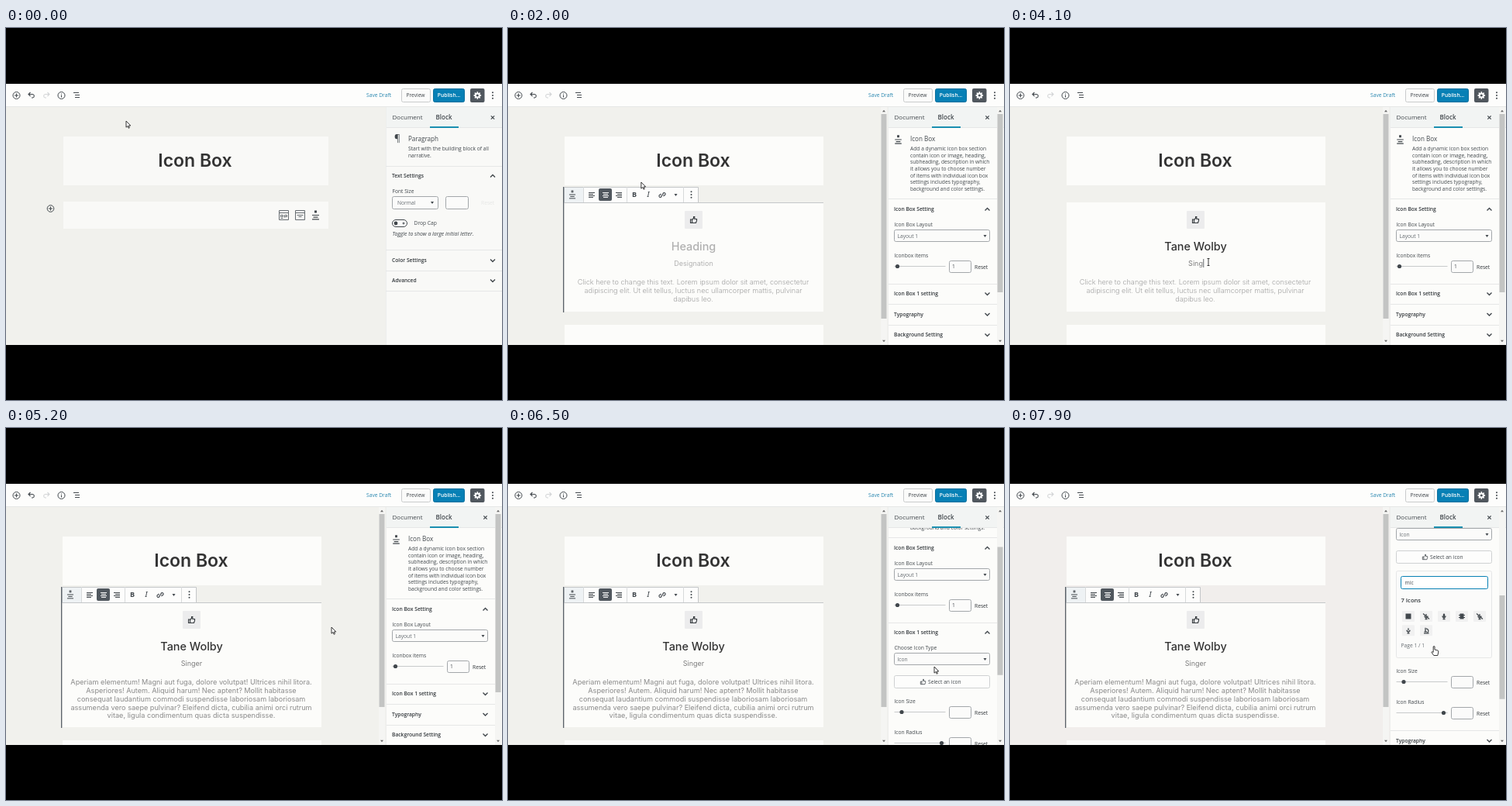
Animation, 640 px wide and 480 px high, one loop 8 s. Source, as an HTML page with a canvas:

```html
<!DOCTYPE html>
<html lang="en">
<head>
<meta charset="utf-8">
<title>Icon Box block</title>
<style>
html, body { margin: 0; width: 100%; height: 100%; overflow: hidden; background: #000; }
canvas { display: block; }
</style>
</head>
<body>
<canvas id="stage" width="640" height="480"></canvas>
<script>
const ctx = document.getElementById('stage').getContext('2d');
const LOOP = 8000, STEP = 100;
const UI = '"Open Sans", "Noto Sans", sans-serif', HEAD = 'Inter, sans-serif';
const INK = '#41474c', SOFT = '#666c71', LINE = '#e6e7e7', BLUE = '#0780b5', EDGE = '#a3a7aa';
const NAME = 'Tane Wolby', ROLE = 'Singer', QUERY = 'mic';

const PLACEHOLDER = [
  'Click here to change this text. Lorem ipsum dolor sit amet, consectetur',
  'adipiscing elit. Ut elit tellus, luctus nec ullamcorper mattis, pulvinar',
  'dapibus leo.'];
const COPY = [
  'Aperiam elementum! Magni aut fuga, dolore volutpat! Ultrices nihil litora.',
  'Asperiores! Autem. Aliquid harum! Nec aptent? Mollit habitasse',
  'consequat laudantium commodi suspendisse laboriosam laboriosam',
  'assumenda vero saepe pulvinar? Eleifend dicta, cubilia animi orci rutrum',
  'vitae, ligula condimentum quas dicta suspendisse.'];
const ABOUT = ['Add a dynamic icon box section', 'contain icon or image, heading,',
  'subheading, description in which', 'it allows you to choose number',
  'of items with individual icon box', 'settings includes typography,',
  'background and color settings.'];

// Icon outlines around their own centre
const ICON = {
  undo: 'M-4 -1H1.5A2.3 2.3 0 0 1 1.5 3.5H0M-1.5 -3.5L-4 -1L-1.5 1.5',
  redo: 'M4 -1H-1.5A2.3 2.3 0 0 0 -1.5 3.5H0M1.5 -3.5L4 -1L1.5 1.5',
  list: 'M-4 -3H3M-2 0H4M-2 3H4',
  plus: 'M-2.5 0H2.5M0 -2.5V2.5',
  close: 'M-2.2 -2.2L2.2 2.2M2.2 -2.2L-2.2 2.2',
  up: 'M-3 1.5L0 -1.5L3 1.5',
  down: 'M-3 -1.5L0 1.5L3 -1.5',
  section: 'M-6 -6H6V6H-6ZM-6 -3H6M-4 0H-1V2H-4ZM1 3V0H4V2H1M-4 4H-1',
  callback: 'M-6 -6H6V6H-6ZM-4 0H4M-2 2H2M-6 -3H6',
  iconbox: 'M-1.5 -4.5H1.5M-1.5 -3.5H1.5M-1.5 -5.5H1.5M-4.5 0H4.5M-3 2.7H3M-4.5 5.4H4.5',
  spacer: 'M-5 -6H5M-5 6H5M0 -4V4M-2 -2L0 -4L2 -2M-2 2L0 4L2 2M-4 0H4',
  divider: 'M-6 -6H6V6H-6Z',
  heading: 'M-3.5 2L0 -6L3.5 2M-2 -1H2M-5 4H5',
  profile: 'M-2 -4A2 2 0 1 0 2 -4A2 2 0 1 0 -2 -4M-5 1H5M-3 3.5H3M-1.5 6H1.5',
  accordion: 'M-6 -5H6V-3H-6ZM-4 0H5M-6 2H3M-6 5H6',
  masonry: 'M-6 -6H-3V-3H-6ZM-1 -6H1V-2H-1ZM3 -6H6V-3H3ZM-6 -1H-3V2H-6ZM3 -1H6V2H3ZM-6 4H-3V6H-6ZM-1 0H1V6H-1ZM3 4H6V6H3Z',
  lines: 'M-5 -4H5M-5 -1H5M-5 2H5M-5 5H1',
  image: 'M-6 -5H6V5H-6ZM-6 3L-2 -1L1 2L3 0L6 3',
  link: 'M-.5 1.5L-2 3A1.9 1.9 0 0 1 -4 .5L-1.5 -1.5M.5 -1.5L2 -3A1.9 1.9 0 0 1 4 -.5L1.5 1.5M-1.5 1L1.5 -1',
  thumb: 'M-4 -.5H-2V4H-4ZM-2 0L0 -2V-4H1.3V-1H4V1L3 4H-2',
  mic: 'M0 -3V0M-2 -.5A2 2 0 0 0 2 -.5M0 1.5V3.5M-1.5 3.5H1.5',
  slash: 'M-4 -3.5L4 3.5',
  scope: 'M-1 -3.5V1M-3 3.5H3.5M0 -2.5A3 3 0 0 1 1.5 3M-2.5 1.5H1'
};

const MOST_USED = [['lines', 'Paragraph'], ['image', 'Image'], ['heading', 'Heading'],
  ['section', 'Gallery'], ['lines', 'List'], ['lines', 'Quote'],
  ['callback', 'Button'], ['image', 'Cover'], ['image', 'Video']];
const CREATIVE = [['section', 'Section'], ['callback', 'Callback'], ['iconbox', 'Icon Box'],
  ['spacer', 'Spacer'], ['divider', 'Divider'], ['heading', 'Advanced|Heading'],
  ['profile', 'Profile Box'], ['accordion', 'Accordion'], ['masonry', 'Post Masonry']];

const POINTER = [[0, 155, 120], [350, 13, 87], [450, 13, 87], [700, 100, 230], [1000, 88, 259],
  [1100, 88, 259], [1450, 163, 190], [1900, 163, 190], [2400, 248, 276], [3300, 248, 276],
  [3600, 256, 302], [4400, 256, 302], [4700, 240, 339], [4900, 240, 339], [5200, 420, 257],
  [5300, 420, 257], [5700, 565, 341], [5900, 565, 341], [6200, 550, 308], [6500, 550, 308],
  [6600, 551, 325], [6900, 551, 325], [7100, 545, 199], [7600, 545, 199], [7900, 547, 282]];
const POINTER_KIND = [[0, 'arrow'], [300, 'hand'], [1600, 'arrow'], [2300, 'beam'],
  [4900, 'arrow'], [5600, 'hand'], [6000, 'arrow'], [6600, 'hand'], [7100, 'beam'], [7800, 'hand']];
const SIDE_SCROLL = [[0, 0], [5900, 0], [6200, 79], [6650, 79], [6900, 240]];
const LIST_SCROLL = [[0, 0], [500, 0], [900, 309]];

const NAME_KEYS = [[0, 0], [2600, 2], [2700, 4], [2800, 7], [2900, 9], [3100, 10]];
const ROLE_KEYS = [[0, 0], [3900, 1], [4000, 3], [4100, 4], [4200, 5], [4300, 6]];
const QUERY_KEYS = [[0, 0], [7300, 1], [7400, 2], [7500, 3]];

const held = (keys, t) => keys.filter(k => k[0] <= t).pop()[1];
function tween(keys, t) {
  const i = keys.findIndex(k => k[0] > t);
  if (i < 0) return keys[keys.length - 1].slice(1);
  const a = keys[i - 1], b = keys[i], u = (t - a[0]) / (b[0] - a[0]), e = u * u * (3 - 2 * u);
  return a.slice(1).map((v, n) => v + (b[n + 1] - v) * e);
}
const scrollAt = (keys, t) => Math.round(tween(keys, t)[0]);

function box(x, y, w, h, fill, stroke, r = 0) {
  ctx.beginPath();
  ctx.roundRect(x, y, w, h, r);
  if (fill) { ctx.fillStyle = fill; ctx.fill(); }
  if (stroke) { ctx.strokeStyle = stroke; ctx.lineWidth = 1; ctx.stroke(); }
}
function dot(x, y, r, color = INK) {
  ctx.beginPath();
  ctx.arc(x, y, r, 0, 7);
  ctx.fillStyle = color;
  ctx.fill();
}
function ring(x, y, r) {
  ctx.beginPath();
  ctx.arc(x, y, r, 0, 7);
  ctx.strokeStyle = INK;
  ctx.lineWidth = 1;
  ctx.stroke();
}
function icon(name, x, y, color = INK, width = 1, scale = 1) {
  ctx.save();
  ctx.translate(x, y);
  ctx.scale(scale, scale);
  ctx.strokeStyle = color;
  ctx.lineWidth = width;
  ctx.stroke(new Path2D(ICON[name]));
  ctx.restore();
}
// y is the middle of the lowercase letters and capitals together
function text(str, x, y, { size = 6.7, weight = 400, color = INK, align = 'left', font = UI, style = '' } = {}) {
  ctx.font = `${style} ${weight} ${size}px ${font}`;
  ctx.fillStyle = color;
  ctx.textAlign = align;
  ctx.textBaseline = 'middle';
  ctx.fillText(str, x, y + .7);
  return ctx.measureText(str).width;
}
const bold = (str, x, y, size = 6.7) => text(str, x, y, { size, weight: 600, color: '#33383c' });
function clipped(x, y, w, h, draw) {
  ctx.save();
  ctx.beginPath();
  ctx.rect(x, y, w, h);
  ctx.clip();
  draw();
  ctx.restore();
}
function triangle(x, y, s, color = INK) {
  ctx.beginPath();
  ctx.moveTo(x - 2, y - s);
  ctx.lineTo(x + 2, y - s);
  ctx.lineTo(x, y + s);
  ctx.fillStyle = color;
  ctx.fill();
}
function scrollbar(x, top, bottom, thumbTop, thumbBottom) {
  box(x, top - 6, 8, bottom - top + 11, '#f5f5f3');
  triangle(x + 4, top, -1.2, '#666');
  triangle(x + 4, bottom, 1.2, '#666');
  box(x + .5, thumbTop, 7, thumbBottom - thumbTop, '#c3c4c3');
}
function kebab(x, y) { for (const d of [-3.7, 0, 3.7]) dot(x, y + d, 1); }

function header() {
  box(0, 72, 640, 29, '#fdfdfc');
  box(0, 101, 640, 1, LINE);
  ring(13.5, 87, 4.5);
  icon('plus', 13.5, 87);
  icon('undo', 33, 86.5, INK, 1.1);
  icon('redo', 52, 86.5, '#d3d5d6', 1.1);
  ring(71.5, 87, 4.5);
  box(71, 86.5, 1, 3, INK);
  box(71, 84.5, 1, 1, INK);
  icon('list', 91, 86.5, INK, 1);
  text('Save Draft', 465, 86.5, { color: '#2b88b0' });
  box(510.5, 78.5, 37, 17, '#fbfbfa', '#c9cbcc', 2);
  text('Preview', 528.5, 86.5, { align: 'center' });
  box(551.5, 78.5, 40, 17, BLUE, '#0a6f9d', 2);
  text('Publish...', 571.5, 86.5, { align: 'center', weight: 600, color: '#fff' });
  box(599, 78, 18.5, 18, '#50575e', '', 2);
  ctx.strokeStyle = '#fff';
  ctx.lineWidth = 2;
  ctx.beginPath();
  ctx.arc(608.3, 87, 2.6, 0, 7);
  ctx.stroke();
  for (let i = 0; i < 8; i++) {
    const a = i * Math.PI / 4;
    dot(608.3 + 4 * Math.cos(a), 87 + 4 * Math.sin(a), .9, '#fff');
  }
  kebab(628, 87);
}

function tabs(closeX) {
  box(490, 102, 150, 27, '#f2f4f3');
  text('Document', 498.5, 115.5, { size: 8 });
  text('Block', 565, 115.5, { size: 8, weight: 600, align: 'center' });
  box(490, 128, 150, 1, LINE);
  box(547, 127, 37, 2, '#1a8fb0');
  icon('close', closeX, 115.5, INK, 1.2);
  box(490, 102, 1, 307, '#edeeed');
}

function panelTitle(str, y, open, x = 618.5) {
  bold(str, 498, y);
  icon(open ? 'up' : 'down', x, y, INK, 1.4);
}
function select(label, x, y, w) {
  box(x, y - 8, w, 15, '#fbfbfa', EDGE, 2);
  text(label, x + 4, y, { color: SOFT });
  triangle(x + w - 6, y, 1.5);
}
function slider(label, y, knob, value) {
  text(label, 498.5, y);
  box(498.5, y + 13, 66, 1, '#c8cacb');
  dot(knob, y + 13.5, 2.6);
  box(569.5, y + 6.5, 28, 15, '#fbfbfa', EDGE, 2);
  text(value, 573, y + 14);
  text('Reset', 602, y + 14.5, { color: '#33383c' });
}

function paragraphSidebar() {
  const rule = y => box(490, y, 150, 1, LINE);
  box(490, 102, 150, 307, '#f9f9f7');
  tabs(628);
  text('¶', 505, 143.5, { size: 12, align: 'center' });
  text('Paragraph', 519, 143, { size: 8.1 });
  text('Start with the building block of all', 519, 156);
  text('narrative.', 519, 164.5);
  rule(178);
  panelTitle('Text Settings', 191, true, 628);
  text('Font Size', 498.5, 210.5);
  box(498.5, 217.5, 59, 16, '#fbfbfa', EDGE, 2);
  text('Normal', 505, 225.5, { color: SOFT });
  triangle(550, 225.5, 1.6);
  box(567.5, 217.5, 29, 16, '#fbfbfa', EDGE, 2);
  text('Reset', 613, 225.5, { color: '#e6e7e6' });
  box(498.5, 247.5, 19, 9, '#fbfbfa', INK, 4.5);
  dot(503, 252, 2.4);
  ring(513, 252, 1);
  text('Drop Cap', 526.5, 251.5);
  text('Toggle to show a large initial letter.', 498.5, 265.5, { style: 'italic', size: 6.9 });
  rule(286);
  panelTitle('Color Settings', 300, false, 628);
  rule(313);
  panelTitle('Advanced', 326, false, 628);
  rule(339);
}

function glyph(n, x, y) {
  box(x - 8, y - 7, 16, 14, '#f1f1f1', '', 1);
  if (n === 0) box(x - 3.5, y - 3.5, 7, 7, INK);
  else if (n === 3) { box(x - 2.5, y - 3.5, 5, 7, INK); box(x - 4, y - 2, 8, 1, INK); box(x - 4, y + 1, 8, 1, INK); }
  else if (n === 6) icon('scope', x, y, INK, 1.3);
  else {
    icon('mic', x, y, INK, 1.3);
    if (n === 2) box(x - 1.2, y - 3.5, 2.4, 4.5, INK, '', 1.2);
    if (n === 1 || n === 4) icon('slash', x, y, INK, 1.2);
  }
}

function iconPicker(y, rows, t) {
  const typed = QUERY.slice(0, held(QUERY_KEYS, t)), found = typed === QUERY;
  box(498.5, y + .5, 123, 76 + 18 * rows, '#fbfbfa', LINE, 2);
  const focus = t >= 7100;
  box(504.5, y + 7.5, 112, 16, '#fff', focus ? BLUE : EDGE, 2);
  const w = text(typed || (focus ? '' : 'Search icon'), 509.5, y + 15.5, { color: typed ? INK : '#999' });
  if (focus && !found) box(510 + w, y + 11, .8, 9, INK);
  bold(found ? '7 Icons' : '1500 Icons', 504.5, y + 38.5, 7.6);
  const total = found ? 7 : rows * 5;
  for (let n = 0; n < total; n++) glyph(n % 7, 514 + 23 * (n % 5), y + 59 + 18.3 * Math.floor(n / 5));
  text(found ? 'Page 1 / 1' : 'Page 1 / 60', 504.5, y + 61 + 18 * rows, { color: SOFT });
}

function iconBoxSidebar(t) {
  const open = t >= 5800, picking = t >= 6700, rows = t >= 7500 ? 2 : 5;
  const scroll = scrollAt(SIDE_SCROLL, t);
  const rule = y => box(490, y, 141, 1, LINE);
  box(490, 102, 150, 307, '#fcfcfa');
  clipped(490, 129, 141, 280, () => {
    ctx.translate(0, -scroll);
    icon('iconbox', 503.5, 144, INK, 1.2, .95);
    text('Icon Box', 519, 143, { size: 8.1 });
    ABOUT.forEach((line, i) => text(line, 519, 155.5 + 8.65 * i));
    rule(220);
    panelTitle('Icon Box Setting', 234, true);
    text('Icon Box Layout', 498.5, 253.5);
    select('Layout 1', 498.5, 268.5, 123);
    slider('Iconbox items', 294, 502.5, '1');
    rule(330);
    panelTitle('Icon Box 1 setting', 343, open);
    let y = 356;
    if (open) {
      text('Choose Icon Type', 498.5, 362.5);
      select('Icon', 498.5, 377.5, 123);
      box(498.5, 398.5, 123, 16, '#fdfdfc', '#cfd1d2', 2);
      icon('thumb', 535.5, 406.5, INK, 1, .8);
      text('Select an icon', 542, 406.5);
      const shift = picking ? 86 + 18 * rows : 0;
      if (picking) iconPicker(424, rows, t);
      slider('Icon Size', 432 + shift, 508, '');
      slider('Icon Radius', 472 + shift, 559.5, '');
      y = 508 + shift;
    }
    for (const title of ['Typography', 'Background Setting', 'Advanced']) {
      rule(Math.round(y));
      panelTitle(title, y + 13.5, false);
      y += 26.5;
    }
    rule(Math.round(y));
  });
  tabs(618.5);
  const content = !open ? 352 : !picking ? 490 : 568 + 18 * rows;
  const top = 111 + scroll * 264 / content;
  scrollbar(631, 107, 404, top, top + 289 * 280 / content);
}

function pageTitle(x, w, fill) {
  box(x, 140, w, 63, fill);
  text('Icon Box', x + w / 2 - 1, 171, { size: 23, weight: 600, color: '#333', align: 'center', font: HEAD });
}

function paragraphCanvas() {
  pageTitle(74, 342, '#f9f9f7');
  box(74, 224, 342, 35, '#f9f9f7');
  ring(57.5, 233, 4.3);
  icon('plus', 57.5, 233);
  icon('section', 358.5, 241.5, SOFT);
  icon('callback', 379.5, 241.5, SOFT);
  icon('iconbox', 399.5, 241.5, INK, 1.2);
}

function toolbar(bottom) {
  box(73, 225, 334, 1, '#c4c7c9');
  box(72.5, 205.5, 173, 20, '#fdfdfc', '#c4c7c9');
  box(71, 205, 1.3, bottom - 204, '#5b626a');
  box(73, 206, 24, 19, '#eef2f4');
  icon('iconbox', 83, 215, INK, 1.1, .9);
  for (const x of [97, 153, 226]) box(x, 205, 1, 20, '#d8dadb');
  box(117, 207, 17, 16, '#50575e', '', 2);
  [108, 126, 143].forEach((x, i) => {
    for (let n = 0; n < 4; n++) {
      const w = n % 2 ? 6 : 8;
      box(x - 4 + (8 - w) * i / 2, 212 + 2 * n, w, 1, i === 1 ? '#fff' : INK);
    }
  });
  text('B', 163, 215, { size: 9, weight: 700, align: 'center' });
  text('I', 181, 215, { size: 9.5, style: 'italic', align: 'center', font: '"Noto Serif", serif' });
  icon('link', 199, 215.5, INK, 1.1);
  triangle(216.5, 215.5, 1.4);
  kebab(236.5, 215);
}

function editable(value, hint, y, style, caret, caretHeight) {
  const center = 239.5;
  const w = text(value || hint, center, y, { align: 'center', font: HEAD, ...style, color: value ? style.color : '#b0b0b0' });
  if (caret) box(center + (value ? w / 2 + .5 : 0), y - caretHeight / 2, .8, caretHeight, INK);
}

function iconBoxCanvas(t) {
  const pasted = t >= 4800, bottom = pasted ? 386 : 366;
  pageTitle(73, 334, '#fcfcfa');
  box(73, 225, 334, bottom - 225, '#fcfcfa');
  box(73, bottom + 17, 334, 409 - bottom - 17, '#fcfcfa');
  box(228, 236, 23, 23, '#ececed', '', 1);
  icon('thumb', 239.5, 247.5, '#33383c', 1.1);
  editable(NAME.slice(0, held(NAME_KEYS, t)), 'Heading', 282,
    { size: 14.4, weight: 500, color: '#333' }, t >= 2400 && t < 3600, 18);
  editable(ROLE.slice(0, held(ROLE_KEYS, t)), 'Designation', 303.5,
    { size: 9, color: '#7d7d7d' }, t >= 3600 && t < 4700, 11);
  (pasted ? COPY : PLACEHOLDER).forEach((line, i) => text(line, 239, 328 + 10.75 * i, {
    size: 9.15, weight: pasted ? 400 : 300, color: pasted ? '#8a8a8a' : '#a2a2a2', align: 'center', font: HEAD
  }));
  const typing = (t >= 2600 && t < 3400) || (t >= 3900 && t < 4500);
  if (!typing) toolbar(bottom);
  scrollbar(481, 107, 404, 111, pasted ? 360 : 375);
}

function blockGrid(title, items, y) {
  bold(title, 19, y);
  icon('up', 188, y, INK, 1.4);
  items.forEach(([name, label], i) => {
    const x = 45 + 60 * (i % 3), row = y + [31, 80, 138][Math.floor(i / 3)] + .5;
    icon(name, x + .5, row, name === 'iconbox' ? INK : SOFT);
    if (name === 'divider') {
      ctx.fillStyle = INK;
      ctx.fill(new Path2D(`M${x - 5.5} ${row - 6}h12v6q-4 3 -7 0t-5 -1z`));
    }
    label.split('|').forEach((part, n) => text(part, x, row + 19.5 + 9 * n, { align: 'center' }));
  });
}

function inserter(t) {
  const scroll = scrollAt(LIST_SCROLL, t);
  ctx.save();
  ctx.shadowColor = 'rgba(0,0,0,.1)';
  ctx.shadowBlur = 8;
  ctx.shadowOffsetY = 2;
  box(1, 101, 217, 232, '#fafaf8');
  ctx.restore();
  box(1.5, 101.5, 216, 231, '', LINE);
  ctx.fillStyle = '#fafaf8';
  ctx.fill(new Path2D('M8 102L13.5 96.5L19 102Z'));
  box(11.5, 110.5, 197, 21, '#fbfbfa', '#a4a8ab', 2);
  text('Search for a block', 19.5, 121.5, { size: 7.6, color: '#85898c' });
  box(1, 141, 216, 1, LINE);
  clipped(1, 142, 208, 190, () => {
    ctx.translate(0, -scroll);
    blockGrid('Most Used', MOST_USED, 155);
    ['Common Blocks', 'Formatting', 'Layout Elements', 'Widgets', 'Embeds'].forEach((name, i) => {
      const y = 329 + 27 * i;
      box(1, y - 14, 208, 1, LINE);
      bold(name, 19, y);
      icon('down', 188, y, INK, 1.4);
    });
    box(1, 450, 208, 1, LINE);
    blockGrid('Creative Blocks', CREATIVE, 464);
    dot(76.5, 463.5, 4.3, '#222');
  });
  const top = 151 + scroll * .2816;
  scrollbar(209, 146, 328, top, top + 54);
}

function pointer(t) {
  const [x, y] = tween(POINTER, t), kind = held(POINTER_KIND, t);
  ctx.save();
  ctx.translate(x, y);
  ctx.lineWidth = .9;
  ctx.strokeStyle = '#222';
  ctx.fillStyle = '#fff';
  if (kind === 'beam') ctx.stroke(new Path2D('M-1.5 -4.5H1.5M0 -4.5V4.5M-1.5 4.5H1.5'));
  else {
    const shape = new Path2D(kind === 'arrow'
      ? 'M0 0V8.2L1.9 6.5L3.2 9.3L4.4 8.7L3.2 6H5.8Z'
      : 'M-.8 0Q.2 -1 1 0V4L5 5Q6 5.3 5.8 7L4.8 11.5H-.2L-3 7.5Q-3.2 6 -.8 7.3Z');
    ctx.fill(shape);
    ctx.stroke(shape);
  }
  ctx.restore();
}

function draw(t) {
  const inserted = t >= 1600;
  box(0, 0, 640, 480, '#000');
  clipped(0, 72, 640, 337, () => {
    box(0, 72, 640, 337, t < 7000 ? '#f1f1ed' : '#f1eeec');
    if (inserted) iconBoxCanvas(t); else paragraphCanvas();
    if (inserted) iconBoxSidebar(t); else paragraphSidebar();
    header();
    if (t >= 400 && !inserted) inserter(t);
    pointer(t);
  });
}

const start = performance.now();
function tick() {
  const t = (performance.now() - start) % LOOP;
  draw(Math.floor(t / STEP) * STEP);
  requestAnimationFrame(tick);
}
tick();
</script>
</body>
</html>
```
